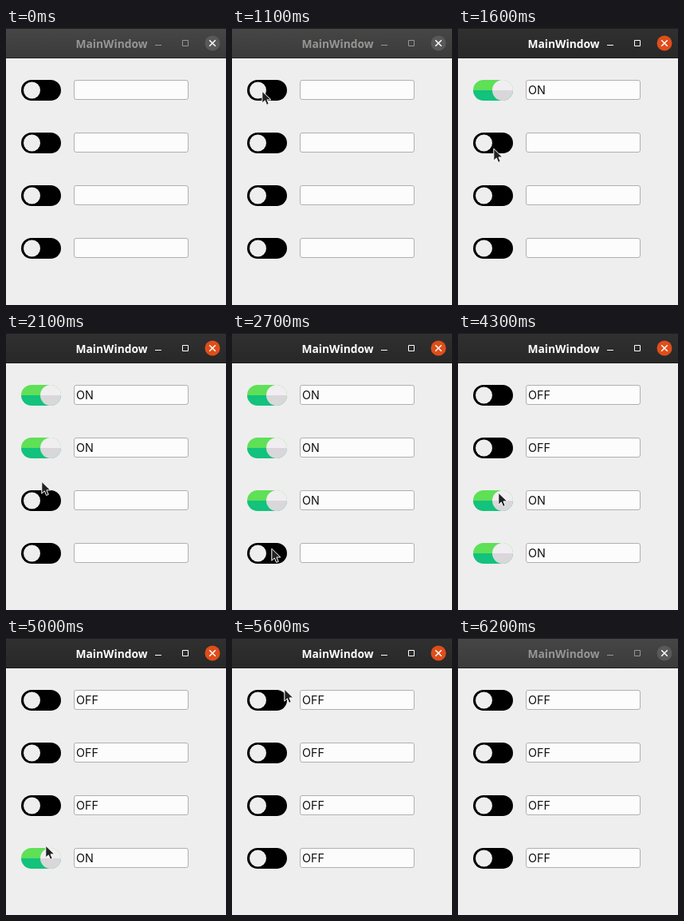
Animation, 276 px wide and 347 px high, one loop 6.5 s. Source, as an HTML page:

```html
<!DOCTYPE html>
<html lang="en">
<head>
<meta charset="utf-8">
<title>Toggle switches</title>
<style>
  html, body { margin: 0; width: 100%; height: 100%; overflow: hidden; background: #eee; }
  svg { display: block; width: 276px; height: 347px; }
  text { font: 14.4px Inter, "Open Sans", sans-serif; fill: #111; }
  .title { font: bold 13.8px "Open Sans", "Noto Sans", sans-serif; text-anchor: middle; }
  .idle { --bar: url(#idleBar); --ink: #979694; --close: #595959; }
  .active { --bar: url(#activeBar); --ink: #fff; --close: #df4e1a; }
  .bar { fill: var(--bar); }
  .title { fill: var(--ink); }
  .icon { fill: none; stroke: var(--ink); }
  .close { fill: var(--close); }

  /* Every state is held until the next one */
  .active, .on, .off, .cursor { animation: 6.5s step-end infinite; }
  .on, .off, .active { opacity: 0; }
  .active { animation-name: focus; }
  .r1 .on { animation-name: on1; }  .r1 .off { animation-name: off1; }
  .r2 .on { animation-name: on2; }  .r2 .off { animation-name: off2; }
  .r3 .on { animation-name: on3; }  .r3 .off { animation-name: off3; }
  .r4 .on { animation-name: on4; }  .r4 .off { animation-name: off4; }
  .cursor { animation-name: move; }

  @keyframes focus { 0%, 95.38% { opacity: 0 } 18.46% { opacity: 1 } }
  @keyframes on1 { 0%, 55.38% { opacity: 0 } 19.99% { opacity: 1 } }
  @keyframes on2 { 0%, 63.07% { opacity: 0 } 29.23% { opacity: 1 } }
  @keyframes on3 { 0%, 69.23% { opacity: 0 } 36.92% { opacity: 1 } }
  @keyframes on4 { 0%, 83.07% { opacity: 0 } 46.15% { opacity: 1 } }
  @keyframes off1 { 0% { opacity: 0 } 55.38%, 100% { opacity: 1 } }
  @keyframes off2 { 0% { opacity: 0 } 63.07%, 100% { opacity: 1 } }
  @keyframes off3 { 0% { opacity: 0 } 69.23%, 100% { opacity: 1 } }
  @keyframes off4 { 0% { opacity: 0 } 83.07%, 100% { opacity: 1 } }

  /* The pointer visits each switch twice, then leaves */
  @keyframes move {
    0% { transform: translate(-40px, 80px) }
    9.23% { transform: translate(13px, 80px) }
    13.84% { transform: translate(20px, 80px) }
    15.38% { transform: translate(31px, 79px) }
    16.92% { transform: translate(37px, 78px) }
    23.07% { transform: translate(34px, 110px) }
    24.61% { transform: translate(44px, 150px) }
    30.76% { transform: translate(43px, 160px) }
    32.3% { transform: translate(44px, 185px) }
    33.84% { transform: translate(44px, 203px) }
    36.92% { transform: translate(44px, 205px) }
    39.99% { transform: translate(46px, 240px) }
    41.53% { transform: translate(49px, 269px) }
    49.23% { transform: translate(54px, 230px) }
    50.76% { transform: translate(52px, 150px) }
    52.3% { transform: translate(48px, 86px) }
    58.46% { transform: translate(48px, 115px) }
    59.99% { transform: translate(49px, 144px) }
    64.61% { transform: translate(50px, 175px) }
    66.15% { transform: translate(50px, 199px) }
    70.76% { transform: translate(50px, 202px) }
    73.84% { transform: translate(50px, 220px) }
    75.38% { transform: translate(49px, 245px) }
    76.92% { transform: translate(49px, 259px) }
    78.46% { transform: translate(49px, 266px) }
    79.99% { transform: translate(49px, 271px) }
    81.53% { transform: translate(48px, 274px) }
    84.61% { transform: translate(54px, 190px) }
    86.15% { transform: translate(65px, 63px) }
    87.69%, 100% { transform: translate(-40px, 80px) }
  }
</style>
</head>
<body>
<svg viewBox="0 0 276 347">
  <defs>
    <linearGradient id="idleBar" x2="0" y2="1">
      <stop stop-color="#464646"/><stop offset="1" stop-color="#3b3b3b"/>
    </linearGradient>
    <linearGradient id="activeBar" x2="0" y2="1">
      <stop stop-color="#303030"/><stop offset="1" stop-color="#282828"/>
    </linearGradient>
    <linearGradient id="green" x2="0" y2="1">
      <stop offset=".5" stop-color="#5fe057"/><stop offset=".5" stop-color="#13c27c"/>
    </linearGradient>
    <linearGradient id="grey" x2="0" y2="1">
      <stop offset=".5" stop-color="#f0eef0"/><stop offset=".5" stop-color="#d9d7d9"/>
    </linearGradient>

    <g id="bar">
      <rect class="bar" y="1" width="276" height="36"/>
      <text class="title" x="132.5" y="25">MainWindow</text>
      <path class="icon" d="M187 21.5h8M221.5 15.5h7v7h-7z"/>
      <circle class="close" cx="259" cy="19" r="9.5"/>
      <path d="M255.2 15.2l7.6 7.6m0-7.6l-7.6 7.6" stroke="#fff" stroke-width="1.5"/>
    </g>

    <g id="base">
      <rect x="19" width="50" height="26" rx="13"/>
      <circle cx="32.5" cy="13" r="10.5" fill="#eee"/>
      <rect x="85.5" y=".5" width="143" height="24" rx="2.5" fill="#fdfcfd" stroke="#b1afb1"/>
    </g>

    <g id="lit">
      <rect x="18" y="-1" width="52" height="28" fill="#eee"/>
      <rect x="19" width="50" height="26" rx="13" fill="url(#green)"/>
      <circle cx="56" cy="13" r="13" fill="url(#grey)"/>
      <text x="88" y="18">ON</text>
    </g>

    <text id="done" x="88" y="18">OFF</text>
  </defs>

  <rect width="276" height="347" fill="#eee"/>
  <rect width="276" height="38" fill="#1d1d1d"/>
  <use class="idle" href="#bar"/>
  <use class="active" href="#bar"/>

  <g class="r1" transform="translate(0 65)">
    <use href="#base"/><use class="on" href="#lit"/><use class="off" href="#done"/>
  </g>
  <g class="r2" transform="translate(0 131)">
    <use href="#base"/><use class="on" href="#lit"/><use class="off" href="#done"/>
  </g>
  <g class="r3" transform="translate(0 197)">
    <use href="#base"/><use class="on" href="#lit"/><use class="off" href="#done"/>
  </g>
  <g class="r4" transform="translate(0 263)">
    <use href="#base"/><use class="on" href="#lit"/><use class="off" href="#done"/>
  </g>

  <path class="cursor" d="M.8 1.2V16.2L4.3 12.9 6.6 18.4 9.3 17.3 7 11.9H11.8Z"
        fill="#222" stroke="#fff"/>
</svg>
</body>
</html>
```
